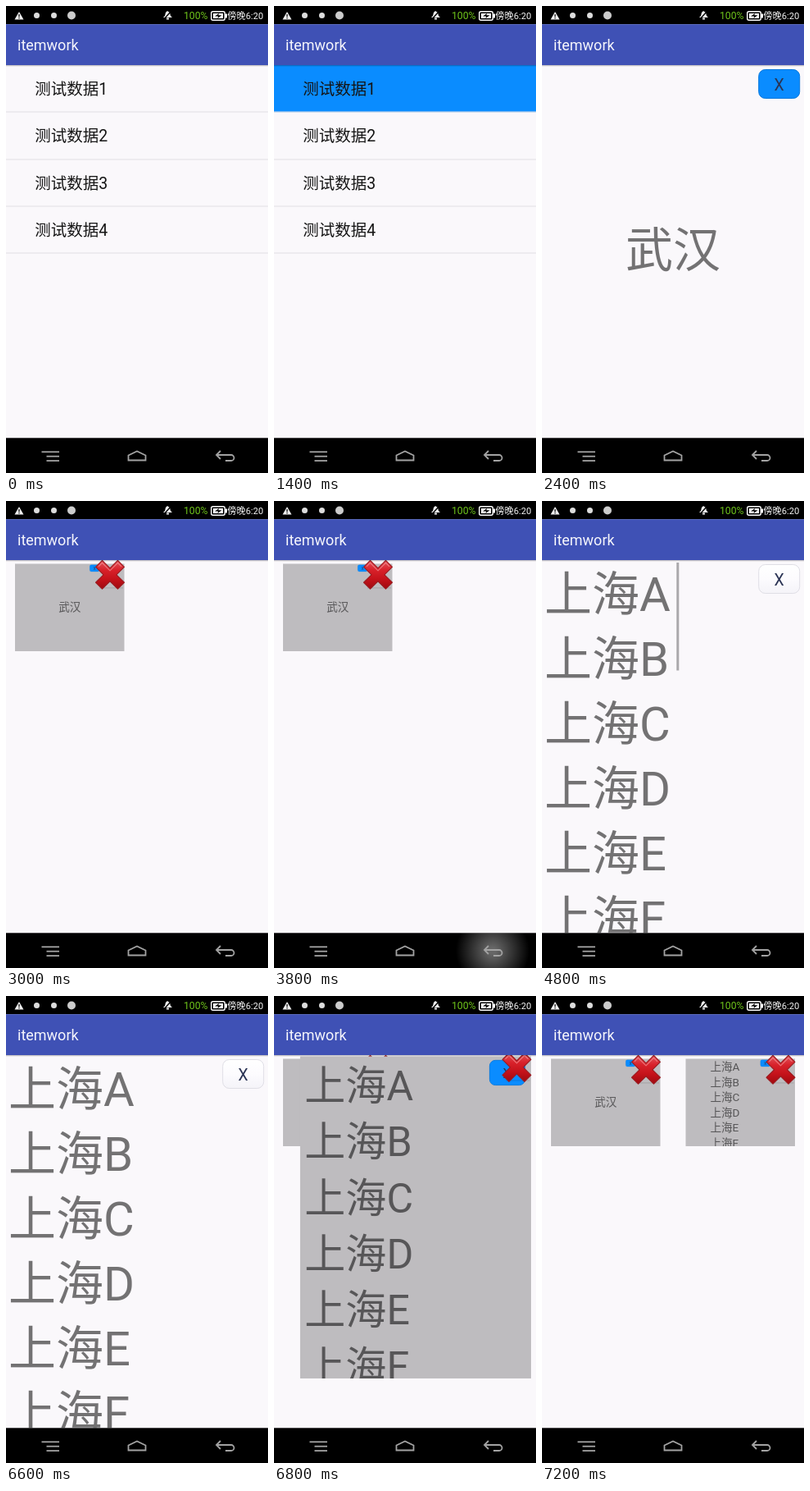
Recreate the animation shown at these times as an HTML page with a canvas. Size 320 by 569 pixels, loop 8 s.

```html
<!DOCTYPE html>
<html lang="zh">
<head>
<meta charset="utf-8">
<style>
html, body { margin: 0; width: 100%; height: 100%; overflow: hidden; background: #faf8fb; }
canvas { display: block; width: 320px; height: 569px; }
</style>
</head>
<body>
<canvas id="stage"></canvas>
<script>
const W = 320, H = 569, STATUS = 22.2, TOP = 72, BOTTOM = 526.3, LOOP = 8000, STEP = 100;
const FONT = 'Roboto, "Noto Sans CJK SC", "Noto Sans CJK", sans-serif';
const PAPER = '#faf8fb', BLUE = '#0a8cff', FADED = 'rgba(0,0,0,.54)';
const ROW = 57.25;
const cells = [11, 175.5].map(x => ({ x, y: 76.5, w: 133.5, h: 106.5 }));
const fullCell = { x: 2, y: 73, w: 313, h: 452 };

const canvas = document.getElementById('stage');
const ctx = canvas.getContext('2d');
const ratio = window.devicePixelRatio || 1;
canvas.width = Math.round(W * ratio);
canvas.height = Math.round(H * ratio);

function rect(x, y, w, h, color) {
  ctx.fillStyle = color;
  ctx.fillRect(x, y, w, h);
}

function text(str, x, y, size, color, align = 'left') {
  ctx.font = `${size}px ${FONT}`;
  ctx.textAlign = align;
  ctx.fillStyle = color;
  ctx.fillText(str, x, y);
}

function trace(points, closed) {
  ctx.beginPath();
  points.forEach(([x, y]) => ctx.lineTo(x, y));
  if (closed) ctx.closePath();
}

function disc(x, y, r, color) {
  ctx.beginPath();
  ctx.arc(x, y, r, 0, Math.PI * 2);
  ctx.fillStyle = color;
  ctx.fill();
}

function verticalFade(y0, y1, ...colors) {
  const g = ctx.createLinearGradient(0, y0, 0, y1);
  colors.forEach((c, i) => g.addColorStop(i / (colors.length - 1), c));
  return g;
}

function withState(draw) {
  ctx.save();
  draw();
  ctx.restore();
}

function drawStatusBar() {
  rect(0, 0, W, STATUS, '#000');
  trace([[16, 7], [21.5, 16.5], [10.5, 16.5]], true);
  ctx.fillStyle = '#eee';
  ctx.fill();
  rect(15.4, 10, 1.2, 3.4, '#000');
  rect(15.4, 14.2, 1.2, 1.2, '#000');
  for (const x of [37.5, 58.5]) disc(x, 11.5, 3.5, '#ddd');
  disc(80, 11.5, 5, '#ccc');

  // muted bell
  trace([[192, 14], [194, 12], [195, 8], [197, 6], [200, 8], [201, 12], [203, 14]], true);
  ctx.fillStyle = '#eee';
  ctx.fill();
  rect(196, 14.5, 3, 2, '#eee');
  trace([[192, 17], [202, 6]]);
  ctx.lineWidth = 1.3;
  ctx.strokeStyle = '#000';
  ctx.stroke();

  text('100%', 217, 16, 12.2, '#6fc51b');

  ctx.beginPath();
  ctx.roundRect(250.7, 6.7, 16.6, 10.6, 2);
  ctx.strokeStyle = '#fff';
  ctx.lineWidth = 1.4;
  ctx.stroke();
  rect(253, 9, 12, 6, '#fff');
  rect(268, 9.5, 2, 5, '#fff');
  trace([[255, 12.6], [260, 9], [259.5, 11.3], [263.5, 11.3], [258.5, 15], [259, 12.6]], true);
  ctx.fillStyle = '#000';
  ctx.fill();

  text('傍晚6:20', 270.3, 16, 11.2, '#f4f4f4');
}

function drawActionBar() {
  rect(0, STATUS, W, TOP - STATUS, '#3f51b5');
  rect(0, TOP, W, 2, verticalFade(TOP, TOP + 2, 'rgba(0,0,0,.28)', 'rgba(0,0,0,0)'));
  text('itemwork', 14, 54, 18, '#f6f6fc');
}

function drawNavBar(glow) {
  rect(0, BOTTOM, W, H - BOTTOM, '#000');
  if (glow) {
    const g = ctx.createRadialGradient(267, 548, 4, 267, 548, 45);
    g.addColorStop(0, `rgba(255,255,255,${0.4 * glow})`);
    g.addColorStop(1, 'rgba(255,255,255,0)');
    rect(214, BOTTOM, 106, H - BOTTOM, g);
  }
  ctx.strokeStyle = '#a3a3a3';
  ctx.lineWidth = 1.8;
  for (const [x, y] of [[43.5, 543.3], [49.5, 548.7], [49.5, 554.1]]) {
    trace([[x, y], [65, y]]);
    ctx.stroke();
  }
  trace([[149.5, 547.5], [160, 542.5], [170.5, 547.5], [170.5, 553.5], [149.5, 553.5]], true);
  ctx.stroke();
  ctx.beginPath();
  ctx.moveTo(262, 542);
  ctx.lineTo(257, 547);
  ctx.lineTo(262, 552);
  ctx.moveTo(257, 547);
  ctx.lineTo(275, 547);
  ctx.arc(275, 550.5, 3.5, -Math.PI / 2, Math.PI / 2);
  ctx.lineTo(268, 554);
  ctx.stroke();
}

function drawList(pressed) {
  for (let i = 0; i < 4; i++) {
    const y = TOP + i * ROW;
    if (i === pressed) rect(0, y, W, ROW, BLUE);
    rect(0, Math.round(y + ROW) - 0.5, W, 1, '#e2e0e3');
    text('测试数据' + (i + 1), 35.2, y + 36.2, 19.5, '#151515');
  }
}

function drawCloseButton(pressed) {
  ctx.beginPath();
  ctx.roundRect(264.7, 77.5, 50, 35, 8);
  ctx.fillStyle = pressed ? BLUE : verticalFade(78, 113, '#fff', '#fcfbfe', '#f4f3f8');
  ctx.fill();
  ctx.strokeStyle = pressed ? '#0878dc' : '#dfdee5';
  ctx.lineWidth = 1;
  ctx.stroke();
  text('X', 289.5, 103, 19.5, '#2a3354', 'center');
}

const pages = [
  () => text('武汉', 160, 318, 58, FADED, 'center'),
  () => [...'ABCDEF'].forEach((c, i) => text('上海' + c, 2.9, 133.8 + i * 79.1, 58, FADED))
];

function drawPage(index, pressed) {
  withState(() => {
    ctx.beginPath();
    ctx.rect(0, TOP, W, BOTTOM - TOP);
    ctx.clip();
    pages[index]();
    drawCloseButton(pressed);
  });
}

function drawRedCross(x, y) {
  withState(() => {
    ctx.translate(x, y);
    rect(-13, 15.5, 29, 1.2, 'rgba(0,0,0,.12)');
    const long = 19, half = 5.6;
    const corners = [];
    for (let k = 0; k < 4; k++) {
      const a = Math.PI / 4 + k * Math.PI / 2, c = Math.cos(a), s = Math.sin(a);
      for (const [u, v] of [[long, -half], [long, half], [half, half]])
        corners.push([u * c - v * s, u * s + v * c]);
    }
    trace(corners, true);
    ctx.fillStyle = verticalFade(-17, 17, '#e2555c', '#d8212a', '#c4121a', '#a00a10');
    ctx.fill();
    ctx.lineJoin = 'round';
    ctx.strokeStyle = '#9c1a1f';
    ctx.lineWidth = 1.2;
    ctx.stroke();
    trace([[-14, -10], [-9.5, -14.5], [0, -5], [9.5, -14.5], [14, -10]]);
    ctx.strokeStyle = 'rgba(255,190,190,.5)';
    ctx.stroke();
  });
}

function drawCell(index, box) {
  rect(box.x, box.y, box.w, box.h, '#bebcbf');
  const scale = Math.min(box.w / W, box.h / (BOTTOM - TOP));
  withState(() => {
    ctx.translate(box.x + (box.w - W * scale) / 2, box.y + (box.h - (BOTTOM - TOP) * scale) / 2);
    ctx.scale(scale, scale);
    ctx.translate(0, -TOP);
    drawPage(index, true);
  });
  drawRedCross(box.x + box.w - 17.5, box.y + 13.3);
}

function drawShrink(index, time) {
  const p = Math.min(1, (time + 50) / 550);
  const eased = (1 - Math.cos(Math.PI * p)) / 2;
  const box = {};
  for (const key of ['x', 'y', 'w', 'h'])
    box[key] = fullCell[key] + (cells[index][key] - fullCell[key]) * eased;
  drawCell(index, box);
}

function drawScrollbar(alpha) {
  if (alpha > 0) rect(164.3, 75, 3, 131.5, `rgba(128,126,130,${0.65 * alpha})`);
}

function drawContent(t) {
  if (t < 1500) drawList(t < 1400 ? -1 : 0);
  else if (t < 2500) drawPage(0, t >= 2400);
  else if (t < 3900) drawShrink(0, t - 2500);
  else if (t < 4300) {
    drawList(-1);
    ctx.globalAlpha = 1 - (t - 3800) / 500;
    rect(0, TOP, W, BOTTOM - TOP, PAPER);
    drawCell(0, cells[0]);
    ctx.globalAlpha = 1;
  }
  else if (t < 4700) drawList(t < 4600 ? -1 : 1);
  else if (t < 6700) {
    drawPage(1, t >= 6500 && t < 6600);
    if (t >= 4800) drawScrollbar(Math.min(1, (6100 - t) / 300));
  }
  else {
    drawCell(0, cells[0]);
    drawShrink(1, t - 6700);
  }
}

function render(now) {
  const t = Math.floor((now % LOOP) / STEP) * STEP;
  ctx.setTransform(ratio, 0, 0, ratio, 0, 0);
  rect(0, 0, W, H, PAPER);
  drawContent(t);
  drawStatusBar();
  drawActionBar();
  drawNavBar(t >= 3800 && t < 4200 ? 1 - (t - 3800) / 400 : 0);
}

const start = performance.now();
function tick() {
  render(performance.now() - start);
  requestAnimationFrame(tick);
}
tick();
</script>
</body>
</html>
```
